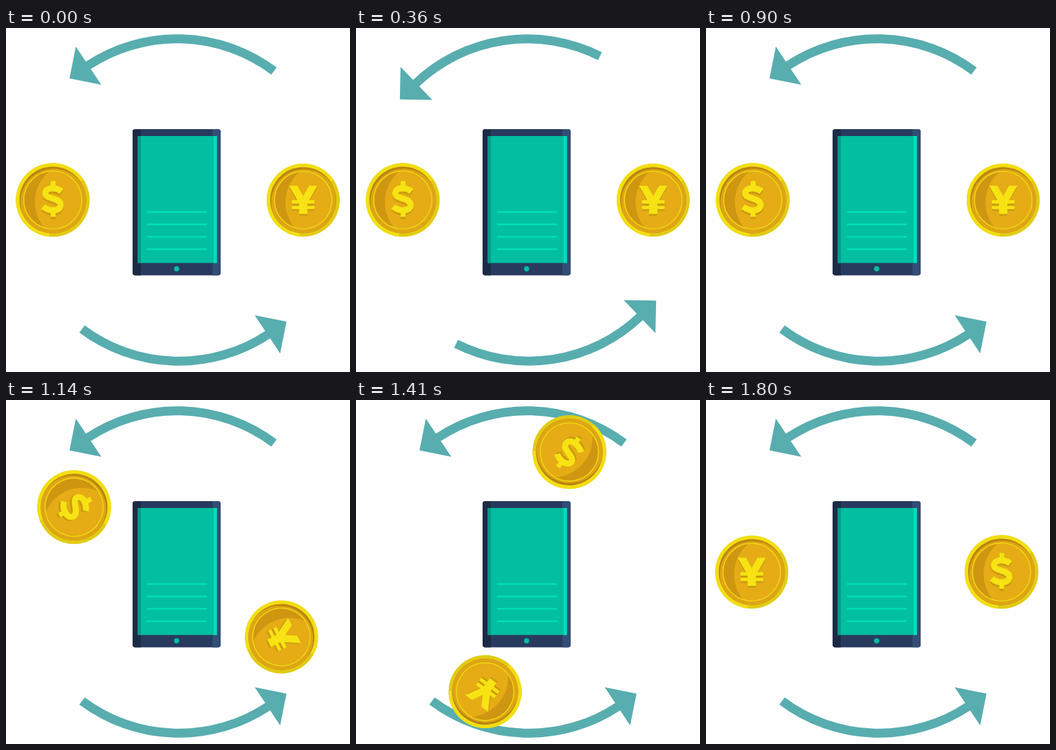
Animation, 500 px wide and 500 px high, one loop 1.86 s. Source, as an HTML page:

```html
<!DOCTYPE html>
<html lang="en">
<head>
<meta charset="utf-8">
<title>Currency exchange</title>
<style>
  html, body { margin: 0; width: 100%; height: 100%; overflow: hidden; background: #fefefe; }
  svg { display: block; width: 100vw; height: 100vh; }
</style>
</head>
<body>
<svg viewBox="0 0 500 500">
  <defs>
    <clipPath id="stage"><rect x="2" width="496" height="500"/></clipPath>
    <clipPath id="rim"><circle r="48.5"/></clipPath>
    <clipPath id="face"><circle r="42"/></clipPath>
    <clipPath id="body"><rect x="184" y="147" width="128" height="212.5" rx="4"/></clipPath>

    <g id="arrow">
      <path d="M389.5 62.5A235 235 0 0 0 119 54.7" fill="none" stroke="#58adaf" stroke-width="13"/>
      <path d="M92.3 73.3L101.5 27L138.5 82.5Z" fill="#58adaf"/>
    </g>

    <g id="disc">
      <circle r="53.6" fill="#e2cb14"/>
      <path d="M-6 53.2A53.6 53.6 0 1 1 44 -30.6L38 -24L-4 46Z" fill="#f2de12"/>
      <circle r="48.5" fill="#b98410"/>
      <circle cx="1.5" cy="3" r="48.5" fill="#dea514" clip-path="url(#rim)"/>
      <circle r="42" fill="#cf9611"/>
      <circle cx="32" cy="3" r="58" fill="#e5ac15" clip-path="url(#face)"/>
      <circle r="42.3" fill="none" stroke="#efd515" stroke-width="1.6"/>
    </g>

    <g id="dollarSign" fill="none" stroke="currentColor">
      <path d="M12.5 -12.5C8.5 -15.8 3.5 -17 -0.5 -17C-7 -17 -10.8 -14 -10.8 -9.5C-10.8 -1 11.3 -3.5 11.3 7C11.3 12 7 15 0.3 15C-5.5 15 -10 13 -14 9.5" stroke-width="8.8"/>
      <path d="M0.5 -27.5V-17M0.5 15V24.5" stroke-width="7"/>
    </g>
    <path id="yenSign" fill="currentColor"
      d="M-20.5 -21H-8.5L0 -6L8.5 -21H20.5L8.5 0H16.5V5H6V8.5H16.5V13H6V20H-6V13H-16.5V8.5H-6V5H-16.5V0H-8.5Z"/>
  </defs>

  <rect width="500" height="500" fill="#fefefe"/>

  <g clip-path="url(#stage)">
    <g id="arrows">
      <use href="#arrow"/>
      <use href="#arrow" transform="rotate(180 250 250)"/>
    </g>
  </g>

  <g clip-path="url(#body)">
    <rect x="184" y="147" width="128" height="213" fill="#283b5e"/>
    <rect x="184" y="147" width="12" height="213" fill="#1c2b45"/>
    <rect x="300" y="147" width="12" height="213" fill="#334d75"/>
  </g>
  <rect x="191.5" y="157" width="115" height="184.5" fill="#02bfa2"/>
  <rect x="191.5" y="157" width="4.5" height="184.5" fill="#08998a"/>
  <rect x="302" y="157" width="4.5" height="184.5" fill="#00dfb8"/>
  <path d="M206 267.5H291M206 285.5H291M206 303.5H291M206 321.5H291"
    stroke="#00dfb5" stroke-width="2.6" stroke-linecap="round"/>
  <circle cx="248" cy="350" r="3.8" fill="#02bfa2"/>

  <path id="dollarPath" d="M68 250C92 8 433.5 8 429.5 250" fill="none"/>
  <path id="yenPath" d="M432 250.2C408 491 62.5 491 66.5 250.2" fill="none"/>

  <g id="dollar">
    <use href="#disc"/>
    <use href="#dollarSign" y="3" color="#cb9a10"/>
    <use href="#dollarSign" color="#f7e313"/>
  </g>
  <g id="yen">
    <use href="#disc" transform="scale(.99)"/>
    <use href="#yenSign" y="2.5" color="#cb9a10"/>
    <use href="#yenSign" color="#f7e313"/>
  </g>
</svg>
<script>
  const LOOP = 1860, STEP = 30, LAST = 1800, PHASE = 900;
  const el = id => document.getElementById(id);
  const arrows = el('arrows');
  const coins = ['dollar', 'yen'].map(id => {
    const path = el(id + 'Path');
    return { node: el(id), path, length: path.getTotalLength() };
  });

  const ease = x => {
    const c = Math.min(1, Math.max(0, x));
    return c * c * (3 - 2 * c);
  };

  function draw(ms) {
    const t = Math.min(LAST, Math.floor((ms % LOOP) / STEP) * STEP);
    arrows.setAttribute('transform', `rotate(${-540 * ease(t / PHASE)} 250 250)`);
    const travel = ease((t - PHASE) / PHASE);
    for (const { node, path, length } of coins) {
      const p = path.getPointAtLength(travel * length);
      node.setAttribute('transform', `translate(${p.x} ${p.y}) rotate(${360 * travel})`);
    }
  }

  const start = performance.now();
  function tick() {
    draw(performance.now() - start);
    requestAnimationFrame(tick);
  }
  tick();
</script>
</body>
</html>
```
